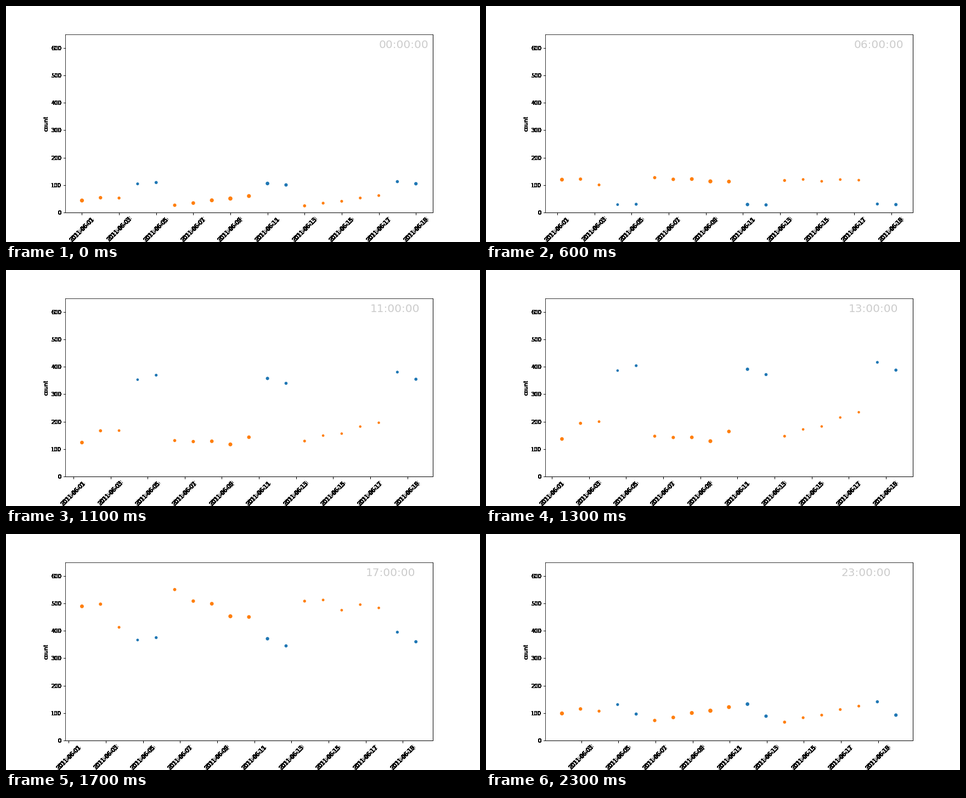
A matplotlib script that plays this animation: 864x432 px, repeating every 2.4 s.

```python
import numpy as np
import matplotlib.pyplot as plt
from matplotlib.animation import FuncAnimation

HOURS = 24
days = np.arange(19)
weekday = (days + 2) % 7  # 1 June 2011 is a Wednesday, Monday is 0
is_free = weekday >= 5
rng = np.random.default_rng(6)
level = rng.normal(1, 0.04, days.size)
base_size = np.interp(days, [0, 2.5, 8, 13, 16, 18], [7, 4.7, 7.4, 4.9, 4.8, 6])
heat = np.clip((base_size - 5.5) / 2, 0, 1)


def bump(x, center, width):
    return np.exp(-((x - center) / width) ** 2 / 2)


def work_count(h):
    """Commuter day: two rush hours, calm midday, livelier nights near Friday."""
    t = (weekday - 2) / 2
    night = 42 * (1 + 0.4 * t) * np.exp(-h / 1.3)
    morning = 400 * (1 - 0.05 * t) * bump(h, 8, 1.25)
    midday = 185 * (1 + 0.2 * t) * (1 - 0.4 * heat) * bump(h, 13, 2.6)
    rush = 380 * bump(h, 17.6, 1.2)
    late = 240 * (1 - 0.1 * t) * bump(h, 20 + 0.6 * t, 2.2)
    return night + morning + midday + rush + late


def free_count(h):
    """Leisure day: one broad afternoon plateau, fading sooner on Sunday."""
    night = 105 * bump(h, 0, 1.95)
    rise = 1 / (1 + np.exp((8.7 - h) / 1.05))
    fall = bump(max(h, 15), 15, np.where(weekday == 5, 5.4, 4.7))
    return night + 395 * rise * fall


def counts(h):
    return level * np.where(is_free, free_count(h), work_count(h))


def areas(h):
    return (base_size + 0.3 * np.cos(2 * np.pi * h / HOURS)) ** 2


def harden(img, dpi):
    """Turn every touched pixel fully opaque."""
    img = img.copy()
    img[..., 3] = img[..., 3] > 0
    return img, 0, 0


plt.rcParams.update({"font.family": "DejaVu Sans", "font.size": 10})
fig, ax = plt.subplots(figsize=(12, 6), dpi=72)
fig.subplots_adjust(left=0.125, right=0.9, bottom=0.125, top=0.88)

dots = ax.scatter(days, counts(0), s=areas(0), linewidths=0,
                  c=np.where(is_free, "C0", "C1"))
clock = ax.text(16, 600, "", fontsize=20, color="#cccccc")

ticks = days[::2]
ax.set_xticks(ticks, [f"2011-06-{d + 1:02d}" for d in ticks], rotation=45)
ax.set_yticks(range(0, 601, 100))
ax.set_ylim(0, 650)
ax.set_ylabel("count").set_agg_filter(harden)

for axis in (ax.xaxis, ax.yaxis):
    for tick in axis.get_major_ticks():
        tick.label1.set_agg_filter(harden)
        tick.tick1line.set_agg_filter(harden)
for side in ("bottom", "right"):
    ax.spines[side].set_agg_filter(harden)


def update(hour):
    shift = hour / HOURS
    dots.set_offsets(np.column_stack([days + shift, counts(hour)]))
    dots.set_sizes(areas(hour))
    ax.set_xlim(shift - 0.9, shift + 18.9)
    clock.set_text(f"{hour:02d}:00:00")
    return dots, clock


anim = FuncAnimation(fig, update, frames=HOURS, init_func=lambda: update(0),
                     interval=100, repeat=True, repeat_delay=0)
plt.show()
```
